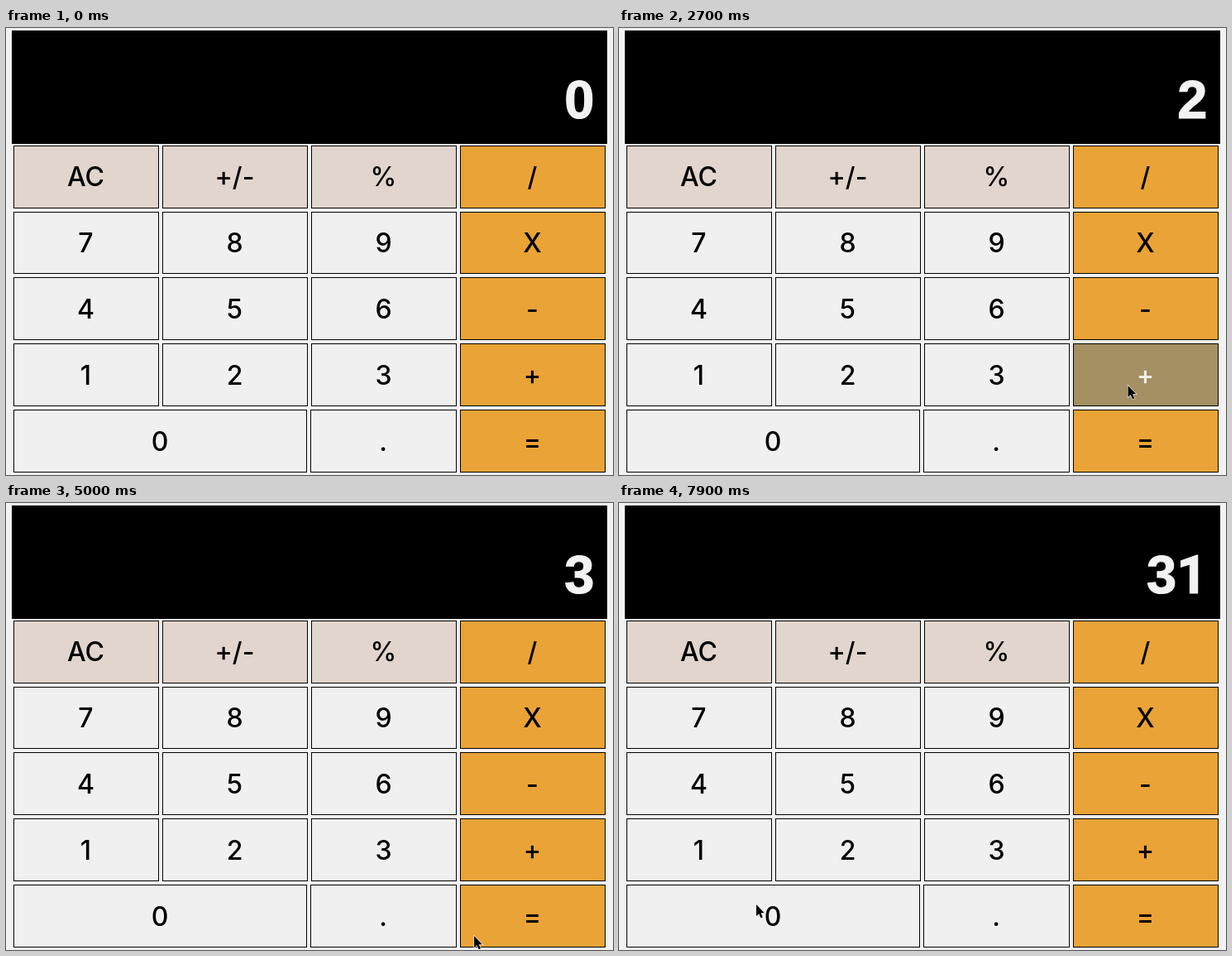
An HTML page that plays this animation: 734x540 px, repeating every 8 s.

```html
<!DOCTYPE html>
<html lang="en">
<head>
<meta charset="utf-8">
<title>Calculator</title>
<style>
  html, body { margin: 0; width: 100%; height: 100%; overflow: hidden; background: #f2f2f2; }
  svg { display: block; }
  .key rect { fill: #f0f0f0; stroke: #000; shape-rendering: crispEdges; }
  .key text { font: 500 32px Inter, Roboto, sans-serif; font-variant-ligatures: none; text-anchor: middle; }
  .key.top rect { fill: #e1d5cd; }
  .key.op rect { fill: #eaa336; }
  .key.down rect { fill: #a49062; }
  .key.down text { fill: #f0f0f0; }
  #display {
    font: bold 65px "Liberation Sans", Arial, sans-serif; text-anchor: end;
    fill: #f2f2f2; stroke: #f2f2f2; stroke-width: 1.2px;
  }
  #display .one { font-family: Roboto, sans-serif; }
</style>
</head>
<body>
<svg width="734" height="540" viewBox="0 0 734 540">
  <rect x="7" y="3" width="720" height="137"/>
  <text id="display" x="711.5" y="109"></text>
  <g id="keys"></g>
  <path id="cursor" d="M0 0V14L3.2 11.2L5.6 16.4L7.8 15.3L5.6 10.3H9.8Z"
        stroke="#fff" stroke-width="1.2" paint-order="stroke"/>
</svg>
<script>
const LOOP = 8000, STEP = 100, HOLD = 250;
const $ = id => document.getElementById(id);
const keys = {};

function addKey(label, x, row, width, kind = '') {
  const y = Math.round(142 + 79.7 * row);
  const height = row === 1 ? 74 : 75;
  const cx = x + width / 2 - .5;
  $('keys').insertAdjacentHTML('beforeend',
    `<g class="key ${kind}">
      <rect x="${x + .5}" y="${y + .5}" width="${width - 1}" height="${height}"/>
      <text x="${cx}" y="${191 + 80 * row}">${label}</text>
    </g>`);
  keys[label] = { node: $('keys').lastElementChild, x: cx, y: y + 38 };
}

['AC +/- % /', '7 8 9 X', '4 5 6 -', '1 2 3 +'].forEach((line, row) =>
  line.split(' ').forEach((label, col) =>
    addKey(label, 9 + 180 * col, row, 176, col === 3 ? 'op' : row ? '' : 'top')));
addKey('0', 9, 4, 355);
addKey('.', 368, 4, 177);
addKey('=', 549, 4, 176, 'op');

// The pointer rests near each key in turn; some it only passes.
const visit = (key, time, dx, dy, press = true) =>
  ({ key, time, press, x: keys[key].x + dx, y: keys[key].y + dy });
const visits = [
  visit('0', 400, 110, 30, false),
  visit('2', 1650, -23, 2),
  visit('+', 2700, -21, 13),
  visit('1', 3450, 14, -25),
  visit('=', 4550, -67, 25),
  visit('.', 6100, 78, 14, false),
  visit('1', 7000, 14, -5),
  visit('0', 7900, -20, -14, false)
];

const type = (text, key) =>
  key === '=' ? String(text.split('+').reduce((sum, n) => sum + Number(n), 0))
  : text === '0' ? key : text + key;

const ease = p => p * p * (3 - 2 * p);

function pointAt(t) {
  const i = visits.findLastIndex(v => v.time <= t);
  const a = visits[i], b = visits[i + 1] ?? a;
  const travel = (t - a.time - HOLD) / (b.time - a.time - 2 * HOLD);
  const p = a === b ? 0 : ease(Math.min(1, Math.max(0, travel)));
  return [a.x + (b.x - a.x) * p, a.y + (b.y - a.y) * p];
}

const start = performance.now();
function draw() {
  const t = Math.floor((performance.now() - start) % LOOP / STEP) * STEP;
  const pressed = visits.filter(v => v.press && v.time < t);
  $('display').innerHTML = pressed.reduce((text, v) => type(text, v.key), '0')
    .replace('1', '<tspan class="one">1</tspan>');

  const plus = visits.find(v => v.key === '+');
  keys['+'].node.classList.toggle('down', t === plus.time);

  const visible = t >= visits[0].time;
  $('cursor').style.display = visible ? '' : 'none';
  if (visible) $('cursor').setAttribute('transform', `translate(${pointAt(t)})`);
  requestAnimationFrame(draw);
}
draw();
</script>
</body>
</html>
```
